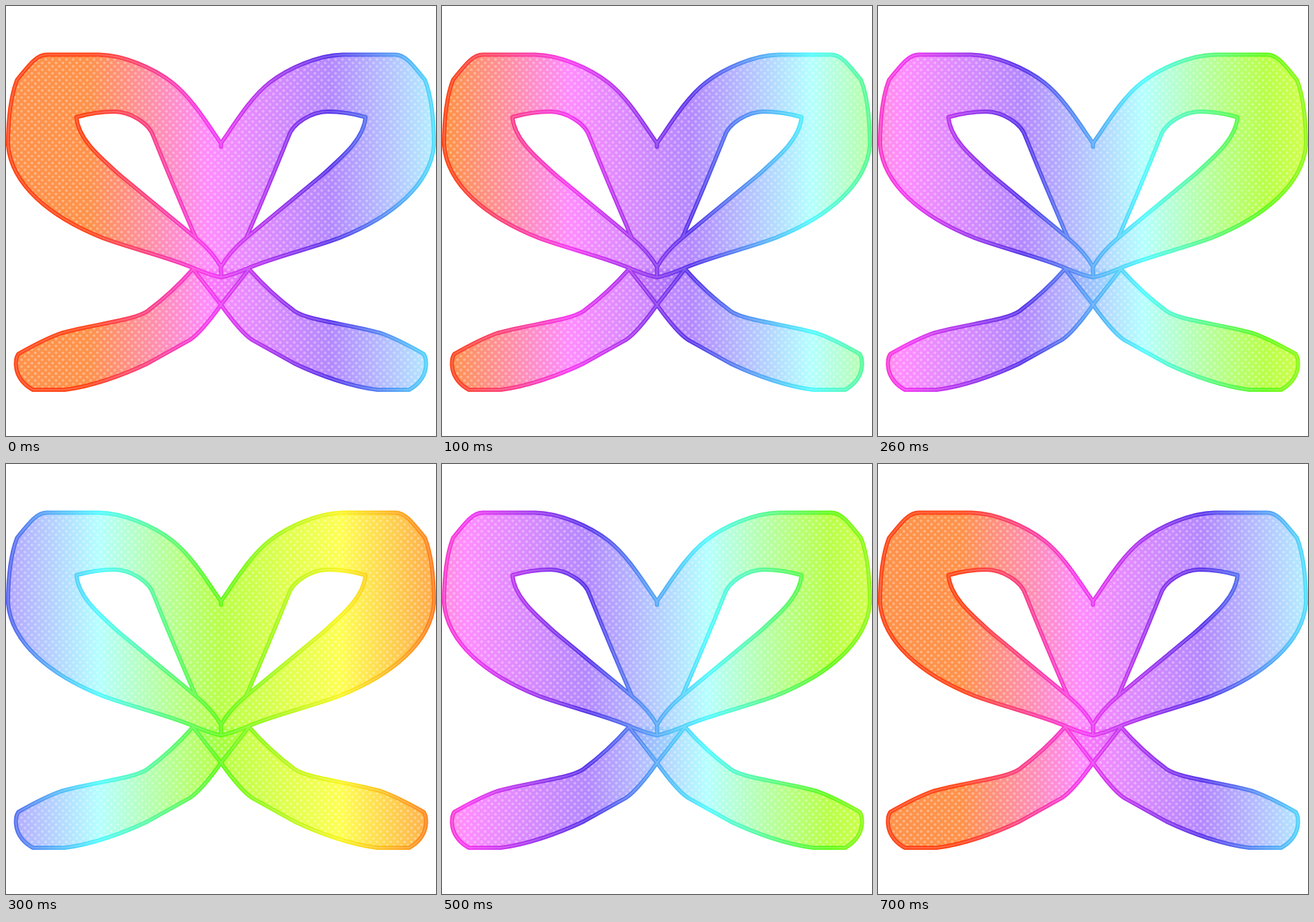
Write an HTML page with a canvas that moves like this. It is 623 by 623 pixels and loops after 0.8 s.

```html
<!DOCTYPE html>
<html lang="en">
<head>
<meta charset="utf-8">
<title>Rainbow ribbon bow</title>
<style>
  html, body { margin: 0; height: 100%; overflow: hidden; background: #fff; }
  canvas { display: block; }
</style>
</head>
<body>
<canvas width="623" height="623"></canvas>
<script>
const SIZE = 623, MID = SIZE / 2;
const ctx = document.querySelector('canvas').getContext('2d');

// Left half of the bow; the right half is its mirror image.
const loop = new Path2D(`M${MID} 199C290 168 268 132 241 111S170 71 135 70.5H60
  C46 70 36 82 16 107C9 125 3 155 3 202C8 258 62 305 140 336
  C180 351 235 364 270 379Q295 390 ${MID} 393`);
const hole = new Path2D(`M275 336C255 290 240 255 214 190C208 170 180 153 157 153
  Q130 153 102 161C105 195 140 222 165 245Z`);
const tail = new Path2D(`M271 381Q240 416 205 442C185 456 130 460 80 474Q57 482 18 504
  C12 512 10 540 39 556H85C120 552 165 537 205 518L266 484Q282 474 ${MID} 433L352 381`);
const fold = new Path2D(`M275 336Q300 357 ${MID} 378`);
const knot = new Path2D(`M271 381L${MID} 433L352 381Z`);
const seams = new Path2D(`M${MID} 197V204M${MID} 375V391`);

// Hues from left to right: orange, pink, violet, cyan, green, yellow, orange.
const FILL = ['#ff924a', '#ff8cff', '#b488ff', '#b4ffff', '#b8ff48', '#ffff52', '#ff924a'];
const LINE = ['#ff4010', '#f733f2', '#5530ea', '#4cfaff', '#5cfa10', '#faf51a', '#ff5518'];
const GAP = 175;
const STARTS = [120, 10, -140, -390]; // x of the first hue at each phase

function mirror(path) {
  const flipped = new Path2D();
  flipped.addPath(path, new DOMMatrix([-1, 0, 0, 1, SIZE, 0]));
  return flipped;
}

function join(...paths) {
  const all = new Path2D();
  paths.forEach(path => all.addPath(path));
  return all;
}

const half = join(loop, hole);
const loops = join(half, mirror(half));
const tails = [tail, mirror(tail)];
const outline = join(loops, ...tails, fold, mirror(fold), seams);

function makeDots(period) {
  const tile = document.createElement('canvas');
  tile.width = tile.height = period;
  const c = tile.getContext('2d');
  c.fillStyle = 'rgba(255,255,255,.32)';
  for (const at of [period / 4, period * 3 / 4]) {
    c.beginPath();
    c.arc(at, at, period / 5, 0, 7);
    c.fill();
  }
  return ctx.createPattern(tile, 'repeat');
}
const dots = makeDots(10);

function rainbow(colors, start) {
  const last = colors.length - 1;
  const gradient = ctx.createLinearGradient(start, 0, start + GAP * last, 0);
  colors.forEach((color, i) => gradient.addColorStop(i / last, color));
  return gradient;
}

function paint(style) {
  ctx.fillStyle = style;
  tails.forEach(path => ctx.fill(path));
  ctx.fill(loops, 'evenodd');
}

function stroke(style, width) {
  ctx.strokeStyle = style;
  ctx.lineWidth = width;
  ctx.stroke(outline);
}

function draw(phase) {
  const line = rainbow(LINE, STARTS[phase]);
  ctx.clearRect(0, 0, SIZE, SIZE);
  ctx.lineJoin = ctx.lineCap = 'round';

  paint(rainbow(FILL, STARTS[phase]));
  paint(dots);

  // The tails overlap in a darker knot.
  ctx.globalAlpha = 0.22;
  ctx.fillStyle = line;
  ctx.fill(knot);
  ctx.globalAlpha = 1;

  stroke(line, 6);
  stroke('rgba(255,255,255,.2)', 2.5);
}

// The colours step left, rest, then step back again.
function tick() {
  const step = Math.floor(performance.now() % 800 / 100);
  draw(Math.min(step, 7 - step));
  requestAnimationFrame(tick);
}
tick();
</script>
</body>
</html>
```
